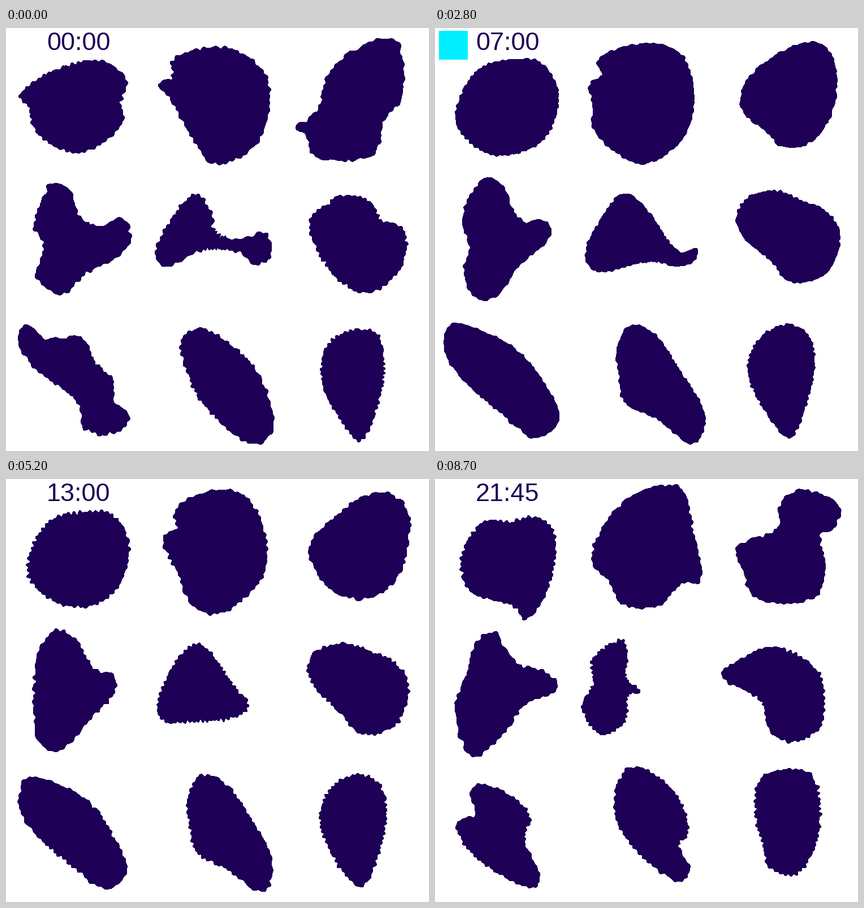
Write a matplotlib script that moves like this. It is 748x748 px and loops after 8800 ms.

```python
import numpy as np
import matplotlib.pyplot as plt
from matplotlib.animation import FuncAnimation
from matplotlib.patches import Polygon, Rectangle

SIZE, FRAMES, STEP_MS = 748, 88, 100
INK, LIGHT = "#1e0056", "#00f0ff"
LIGHT_ON, LIGHT_OFF = 8, 48
KEYS = (0, 20, 46, 87)
U = np.linspace(0, 1, 600, endpoint=False)
TAU = 2 * np.pi
rng = np.random.default_rng(4)
cells = []


def smooth(xy):
    """Closed Hermite curve through the points; sharp corners stay sharp."""
    p = np.array(xy[::2]) + 1j * np.array(xy[1::2])
    q = np.roll(p, -1)
    size = abs(q - p)
    unit = (q - p) / size
    tan = (unit + np.roll(unit, 1)) / 2
    t = np.linspace(0, 1, 24, endpoint=False)[:, None]
    ease = t * t * (3 - 2 * t)
    curve = (p + (q - p) * ease + tan * size * t * (1 - t)**2
             - np.roll(tan, -1) * size * t * t * (1 - t))
    return curve.T.ravel()


def outline(xy):
    """Resample from the leftward ray, by a blend of arc length and angle."""
    z = smooth(xy)
    mid = z.mean()
    z = np.roll(z, -np.argmin(abs(np.angle(mid - z))))
    z = np.append(z, z[0])
    arc = np.append(0, np.cumsum(abs(np.diff(z))))
    ang = np.unwrap(np.angle(mid - z))
    s = 0.65 * arc / arc[-1] + 0.35 * (ang - ang[0]) / TAU
    s = np.maximum.accumulate(s / s[-1])
    return np.interp(U, s, z)


def cell(*poses):
    """Three poses: the middle one is held while the light is on."""
    shapes = [outline(p) for p in poses]
    if len(shapes) < len(KEYS):
        shapes.insert(1, shapes[1])
    modes = rng.integers(12, 58, 14)
    phase = rng.uniform(0, TAU, 14)
    drift = rng.uniform(-0.2, 0.2, 14)
    cells.append((shapes, modes, phase, drift))


cell((24,121, 43,100, 88,74, 172,59, 214,95, 203,130, 207,164, 134,220, 82,207, 49,176, 39,138),
     (38,170, 47,116, 82,70, 150,55, 185,60, 218,114, 190,199, 100,224),
     (46,148, 60,105, 90,74, 134,76, 173,67, 205,84, 210,155, 170,242, 154,248, 148,232, 60,196))
cell((269,98, 294,88, 293,60, 364,34, 412,42, 462,90, 442,206, 366,240, 330,195, 288,122),
     (271,94, 293,86, 283,62, 384,30, 436,48, 457,125, 437,197, 368,241, 325,224, 267,179, 276,135),
     (277,102, 301,88, 295,56, 382,20, 430,40, 461,120, 438,195, 366,241, 326,220, 303,160),
     (278,147, 300,80, 345,32, 404,11, 434,16, 456,90, 466,184, 440,183, 395,224, 328,219, 310,184))
cell((513,181, 552,143, 566,90, 606,45, 686,20, 698,128, 670,160, 652,221, 580,234, 540,222, 532,190),
     (545,107, 575,68, 672,25, 697,42, 707,115, 690,172, 658,207, 608,206, 596,184, 546,148),
     (536,125, 570,70, 676,25, 704,48, 717,100, 692,175, 632,211, 574,192),
     (533,123, 608,84, 609,48, 640,20, 716,50, 710,80, 682,102, 690,150, 676,205, 612,220, 560,204, 548,170))
cell((50,350, 66,300, 80,275, 112,286, 130,333, 160,350, 208,338, 221,370, 205,398, 140,435,
      99,471, 54,440, 67,385),
     (48,340, 70,285, 97,263, 124,285, 138,328, 164,346, 190,337, 212,357, 145,422, 110,474,
      75,480, 51,420, 66,390),
     (50,353, 56,305, 90,265, 124,282, 155,338, 187,346, 190,378, 150,425, 93,480, 60,465, 52,415),
     (36,402, 56,345, 76,285, 106,271, 124,300, 155,332, 185,336, 218,368, 155,402, 130,440, 66,491))
cell((265,405, 288,345, 337,294, 360,320, 372,362, 405,374, 460,364, 468,402, 446,419, 412,397,
      350,392, 278,421),
     (265,402, 290,343, 335,290, 380,328, 420,390, 440,402, 472,388, 472,406, 435,420, 400,408, 278,428),
     (268,405, 290,345, 340,292, 376,320, 425,382, 442,402, 434,418, 340,425, 280,430),
     (260,402, 280,362, 278,320, 333,286, 340,310, 338,352, 364,377, 343,381, 336,428, 295,452))
cell((538,338, 570,310, 590,297, 645,308, 662,338, 702,355, 700,420, 643,468, 600,455, 548,388),
     (533,335, 552,301, 604,288, 650,306, 690,323, 716,363, 690,435, 626,448, 596,414, 543,366),
     (506,345, 535,322, 598,297, 678,342, 688,390, 680,440, 628,465, 592,445, 578,395))
cell((22,555, 31,525, 72,549, 135,548, 157,590, 190,625, 190,655, 219,692, 182,719, 136,705,
      130,668, 45,595),
     (16,550, 28,524, 95,541, 140,566, 188,620, 219,694, 180,725, 120,684, 22,584),
     (40,605, 70,595, 64,547, 90,541, 168,597, 158,635, 185,708, 178,721, 120,702, 48,640))
cell((311,550, 342,531, 390,555, 440,602, 470,675, 472,710, 445,736, 345,660, 329,630),
     (321,572, 345,526, 380,535, 430,601, 478,695, 458,735, 392,691, 335,661, 325,610),
     (320,600, 324,535, 348,509, 424,555, 446,630, 431,645, 450,690, 438,711, 380,680, 335,630))
cell((560,630, 566,565, 605,536, 655,540, 668,590, 664,640, 625,730, 590,690),
     (553,600, 576,547, 626,524, 660,543, 671,585, 658,660, 627,725, 588,684),
     (568,605, 576,530, 630,513, 664,522, 680,613, 660,675, 636,700, 590,685, 580,645))


def shape_at(frame, shapes, modes, phase, drift):
    i = min(np.searchsorted(KEYS, frame, "right") - 1, len(KEYS) - 2)
    mix = (frame - KEYS[i]) / (KEYS[i + 1] - KEYS[i])
    z = shapes[i] * (1 - mix) + shapes[i + 1] * mix
    # ruffled edge, calmer while the light is on
    rough = 0.32 if LIGHT_ON <= frame < LIGHT_OFF else 0.48
    wave = np.sin(TAU * np.outer(U, modes) + phase + drift * frame).sum(axis=1)
    d = np.roll(z, -1) - np.roll(z, 1)
    z = z - 1j * d / np.maximum(abs(d), 1e-6) * rough * wave
    return np.column_stack([z.real, z.imag])


fig = plt.figure(figsize=(SIZE / 100, SIZE / 100), dpi=100, facecolor="white")
ax = fig.add_axes([0, 0, 1, 1])
ax.set(xlim=(0, SIZE), ylim=(SIZE, 0))
ax.axis("off")
lamp = ax.add_patch(Rectangle((7, 5), 51, 51, fc=LIGHT, lw=0))
clock = ax.text(72, 38.5, "", family="Liberation Sans", size=45 * 0.72, color=INK)
blobs = [ax.add_patch(Polygon([(0, 0), (1, 0), (0, 1)], fc=INK, lw=0, antialiased=False))
         for _ in cells]


def draw(frame):
    lamp.set_visible(LIGHT_ON <= frame < LIGHT_OFF)
    clock.set_text(f"{frame // 4:02d}:{frame % 4 * 15:02d}")
    for blob, spec in zip(blobs, cells):
        blob.set_xy(shape_at(frame, *spec))
    return [lamp, clock, *blobs]


anim = FuncAnimation(fig, draw, frames=FRAMES, interval=STEP_MS, init_func=lambda: draw(0),
                     repeat=True, repeat_delay=0)
plt.show()
```
